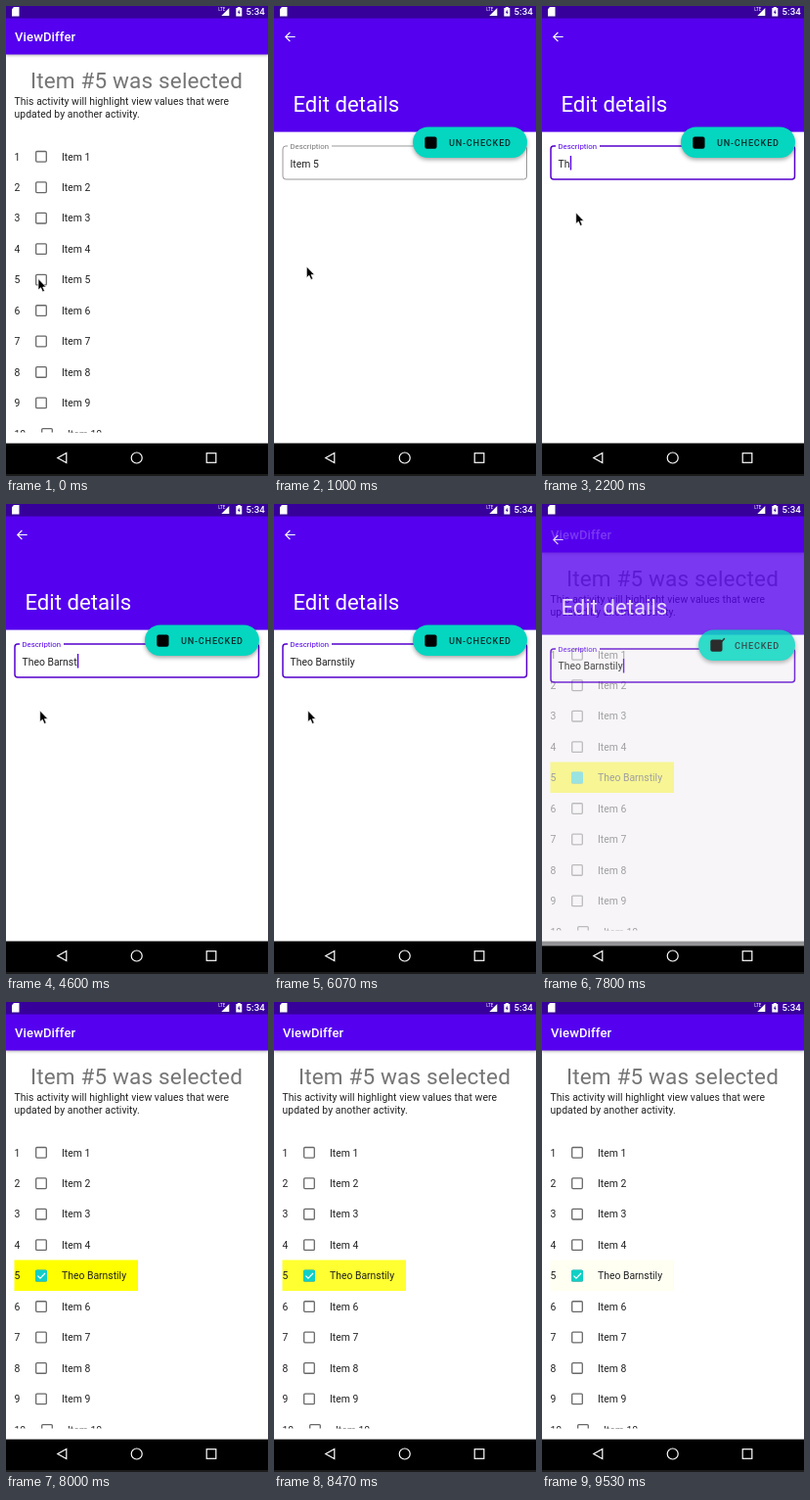
Animation, 268 px wide and 480 px high, one loop 9.59 s. Source, as an HTML page:

```html
<!DOCTYPE html>
<html lang="en">
<head>
<meta charset="utf-8">
<title>ViewDiffer</title>
<style>
  html, body { margin: 0; width: 100%; height: 100%; overflow: hidden; background: #fff; }
  svg { display: block; width: 100vw; height: 100vh; }
  text { font: 10.4px Roboto, sans-serif; fill: #222; white-space: pre; }
  .bar { fill: #5500ee; }
  .big { font-size: 22.2px; }
  .white { fill: #fff; }
  .line { fill: none; stroke: #fff; stroke-width: 1.2; }
  .box { fill: none; stroke: #686868; stroke-width: 1.3; }
  .shadow { filter: drop-shadow(0 1.5px 1.5px rgba(0, 0, 0, .3)); }
  #fab { filter: drop-shadow(0 2px 2px rgba(0, 0, 0, .35)); }
  #fabLabel { font-size: 9.1px; font-weight: 500; letter-spacing: .82px; fill: #0b2b2b; }
</style>
</head>
<body>
<svg viewBox="0 0 268 480" preserveAspectRatio="none">
  <clipPath id="listClip"><rect width="268" height="435.5"/></clipPath>

  <g id="listPage">
    <rect width="268" height="480" fill="#fff"/>
    <rect class="bar shadow" width="268" height="49.5"/>
    <text class="white" x="9" y="36" style="font-size:13px;font-weight:500;letter-spacing:.15px">ViewDiffer</text>
    <text class="big" x="133.5" y="84" text-anchor="middle" style="font-size:22.5px;letter-spacing:.16px;fill:#757575">Item #5 was selected</text>
    <g style="letter-spacing:.05px">
      <text x="8.5" y="101">This activity will highlight view values that were</text>
      <text x="8.5" y="114">updated by another activity.</text>
    </g>
    <rect id="highlight" x="8.5" y="263.5" width="126.5" height="31.5" fill="#ff0"/>
    <g id="rows" clip-path="url(#listClip)"></g>
    <rect y="446.6" width="268" height="34"/>
  </g>

  <g id="editPage">
    <g id="editBack">
      <rect id="paper" y="128.6" width="268" height="318"/>
      <rect y="446.6" width="268" height="34"/>
    </g>
    <rect id="editHeader" class="bar" width="268" height="128.6"/>
    <g id="editFront">
      <path class="line" d="M21.7 31.5H11.9M16.4 26.9L11.8 31.5L16.4 36.1"/>
      <text class="big white" x="19.4" y="107.6">Edit details</text>
      <path id="outline" fill="none" d="M14 143H12Q9 143 9 146V174Q9 177 12 177H255.5Q258.5 177 258.5 174V146Q258.5 143 255.5 143H59"/>
      <text id="fieldLabel" x="16.5" y="146" style="font-size:7.8px">Description</text>
      <text id="fieldText" x="16.5" y="164.5"></text>
      <rect id="caret" y="153" width="1.4" height="14.5" fill="#5500ee"/>
      <rect id="fab" y="123.5" height="31.5" rx="15.75" fill="#04d6c0"/>
      <g id="fabIcon">
        <rect y="133.5" width="12.2" height="12.2" rx="2"/>
        <path id="fabTick" d="M9 138L14.5 132.3" stroke="#000" stroke-width="1.5"/>
      </g>
      <text id="fabLabel" y="143"></text>
    </g>
  </g>

  <rect width="268" height="12.6" opacity=".35"/>
  <path class="white" d="M8 1H13.5V10.5H6V3.3Z"/>
  <path class="white" d="M228.3 2V10H220.3Z"/>
  <text class="white" x="217.3" y="5" style="font-size:4.5px">LTE</text>
  <path class="white" d="M236.8 1H239.8V2H241.3V10.5H235.3V2H236.8Z"/>
  <path d="M238.8 3.5L236.8 6.7H238.2L237.8 9L239.8 5.8H238.4Z" fill="#3700a0"/>
  <text class="white" x="245.6" y="9" style="font-size:9.7px;font-weight:500">5:34</text>
  <path class="line" d="M61.8 456.5V466.5L52.8 461.5Z"/>
  <circle class="line" cx="133.7" cy="461.5" r="5.5"/>
  <rect class="line" x="205.2" y="456.7" width="9.6" height="9.6"/>
  <rect y="478" width="268" height="2" fill="#1c1c1c"/>
  <path id="pointer" d="M0 0V11.5L2.6 9.2L4.5 13.5L6.5 12.6L4.7 8.5H8.2Z" stroke="#fff" stroke-width=".7"/>
</svg>

<script>
const LOOP = 9590;
const NAME = 'Theo Barnstily';
const KEY_TIMES = [2070, 2200, 2400, 2600, 2930, 3270, 3400, 3530, 4070, 4200, 4470, 4930, 5130, 5370];
const FOCUS = 1470, TOGGLE = 6530, OPEN = 530, CLOSE = 7690;
const SLIDE = 38;
// time, x, y of the pointer tip
const POINTER = [
  [0, 33, 278.5], [900, 33, 278.5], [1400, 36, 160], [1600, 36, 160], [1870, 34.7, 211],
  [6070, 34.7, 211], [6450, 190, 138], [6680, 190, 138], [6870, 135, 123.5],
  [7000, 70, 45], [7200, 16, 31], [7400, 16, 31], [7530, -14, 1]
];

const $ = id => document.getElementById(id);
const clamp = v => Math.min(1, Math.max(0, v));
const set = (id, attrs) => {
  for (const key in attrs) $(id).setAttribute(key, attrs[key]);
};
const show = (id, on) => set(id, { visibility: on ? 'inherit' : 'hidden' });

$('rows').innerHTML = Array.from({ length: 10 }, (_, i) => {
  const n = i + 1, y = 153.8 + 31.45 * i, dx = n > 9 ? 6 : 0, base = y + 3.7;
  const ticked = n === 5
    ? `<g id="ticked"><rect x="30" y="${y - 6}" width="12" height="12" rx="1.5" fill="#10cfc5"/>
       <path id="tick" class="line" d="M32.5 ${y}l2.5 2.6l5-5.2"/></g>` : '';
  return `<text x="8.5" y="${base}">${n}</text>
    <rect class="box" x="${30.7 + dx}" y="${y - 5.3}" width="10.6" height="10.6" rx="1"/>${ticked}
    <text id="item${n}" x="${57 + dx}" y="${base}">Item ${n}</text>`;
}).join('');

function pointerAt(t) {
  const i = POINTER.findIndex(p => p[0] > t);
  if (i < 0) return POINTER[POINTER.length - 1].slice(1);
  const [t0, x0, y0] = POINTER[i - 1], [t1, x1, y1] = POINTER[i];
  const p = (t - t0) / (t1 - t0), k = p * p * (3 - 2 * p);
  return [x0 + (x1 - x0) * k, y0 + (y1 - y0) * k];
}

function drawList(t) {
  const updated = t >= OPEN + 350;
  $('item5').textContent = updated ? NAME : 'Item 5';
  show('ticked', updated);
  show('tick', t >= CLOSE + 200);
  set('highlight', { opacity: updated ? clamp((9600 - t) / 1400) : 0 });
}

function drawField(t) {
  const focused = t >= FOCUS;
  const typed = KEY_TIMES.filter(k => k <= t).length;
  const lastKey = typed ? KEY_TIMES[typed - 1] : FOCUS;
  $('fieldText').textContent = typed ? NAME.slice(0, typed) : 'Item 5';
  set('outline', { stroke: focused ? '#5500cc' : '#999', 'stroke-width': focused ? 1.5 : 1 });
  $('fieldLabel').style.fill = focused ? '#5500ee' : '#777';
  set('caret', { x: 16.8 + $('fieldText').getComputedTextLength() });
  show('caret', focused && Math.floor((t - lastKey) / 500) % 2 === 0);
}

function drawFab(t) {
  const checked = t >= TOGGLE, left = checked ? 160 : 142;
  set('fab', { x: left, width: 259 - left });
  set('fabIcon', { transform: `translate(${left + 12.3} 0)` });
  set('fabLabel', { x: left + 37 });
  $('fabLabel').textContent = checked ? 'CHECKED' : 'UN-CHECKED';
  show('fabTick', checked);
}

function drawEdit(t) {
  const closing = t >= CLOSE;
  const alpha = closing ? clamp(1 - (t - CLOSE - 50) / 155) : clamp((t - OPEN) / 200);
  const shift = closing
    ? clamp((t - CLOSE) / 250) ** 2.5
    : (1 - clamp((t - OPEN) / 350)) ** 3;
  show('editPage', alpha > 0);
  set('editPage', { transform: `translate(0 ${SLIDE * shift})` });
  set('paper', { fill: closing ? '#f2f0f3' : '#fff' });
  set('editBack', { opacity: alpha });
  set('editHeader', { opacity: Math.sqrt(alpha) });
  set('editFront', { opacity: alpha ** 0.4 });
  drawField(t);
  drawFab(t);
}

function draw() {
  const t = performance.now() % LOOP;
  drawList(t);
  drawEdit(t);
  set('pointer', { transform: `translate(${pointerAt(t)})` });
  requestAnimationFrame(draw);
}
draw();
</script>
</body>
</html>
```
